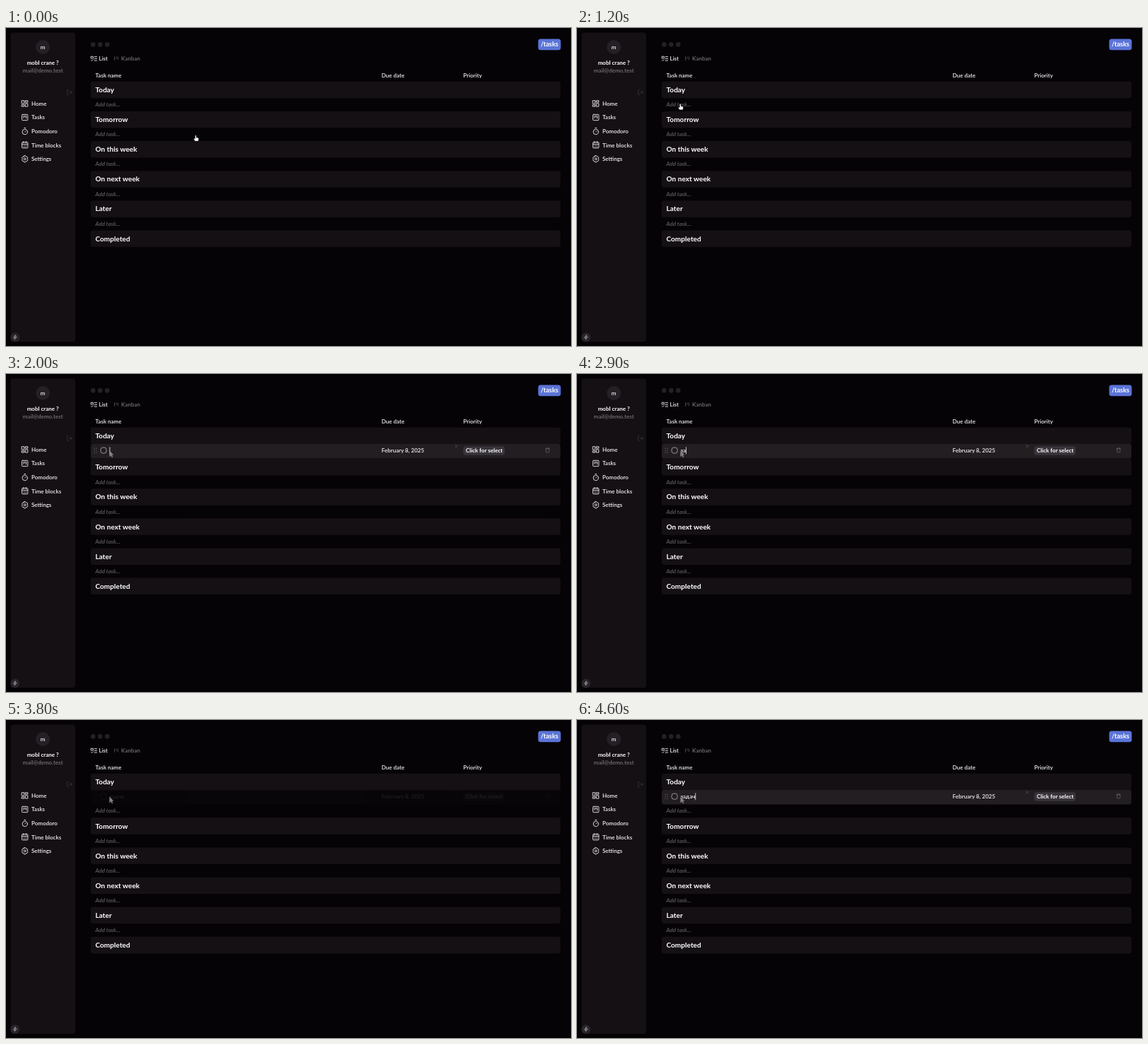
An HTML page for the animation above (5000 ms loop, 800 by 450 pixels).

```html
<!DOCTYPE html>
<html lang="en">
<head>
<meta charset="utf-8">
<title>Task list</title>
<style>
  html, body { margin: 0; width: 100%; height: 100%; overflow: hidden; background: #060307; }
  svg { display: block; width: 100vw; height: 100vh; }
  text { font: 600 8px Lato, "Open Sans", sans-serif; fill: #f4f2f5; }
  .bold { font-weight: 700; fill: #fff; }
  .title { font-size: 10.1px; }
  .add { font-style: italic; fill: #615d62; }
  .muted { fill: #767277; }
  .icon { fill: none; stroke: #ece9ed; stroke-width: 2; stroke-linecap: round; stroke-linejoin: round; }
</style>
</head>
<body>
<svg id="stage" viewBox="0 0 800 450" xmlns="http://www.w3.org/2000/svg"></svg>
<script>
const LOOP = 5000, STEP = 100;
const PANEL = '#151014', CHIP = '#252025';
const stage = document.getElementById('stage');

const rect = (x, y, w, h, r, fill) =>
  `<rect x="${x}" y="${y}" width="${w}" height="${h}" rx="${r}" fill="${fill}"/>`;
const dot = (x, y, r, fill) => `<circle cx="${x}" cy="${y}" r="${r}" fill="${fill}"/>`;
const label = (x, y, str, cls = '', extra = '') =>
  `<text x="${x}" y="${y}" class="${cls}" ${extra}>${str}</text>`;
// Icons are drawn on a 24 unit grid and centred on (x, y).
const icon = (x, y, d, scale = 0.5, stroke = '#ece9ed') =>
  `<path class="icon" style="stroke:${stroke}" d="${d}" transform="translate(${x} ${y}) scale(${scale}) translate(-12 -12)"/>`;

const SQUARE = 'M5 3H19Q21 3 21 5V19Q21 21 19 21H5Q3 21 3 19V5Q3 3 5 3Z';
const ICONS = {
  home: 'M3 3H10V12H3ZM14 3H21V8H14ZM14 12H21V21H14ZM3 16H10V21H3Z',
  board: SQUARE + 'M8 7V14M12 7V11M16 7V15',
  timer: 'M10 2H14M12 14L15 11M20 14A8 8 0 1 1 4 14A8 8 0 1 1 20 14',
  calendar: SQUARE + 'M3 9H21M8 1V5M16 1V5M8 13H8.1M12 13H12.1M16 13H16.1M8 17H8.1M12 17H12.1M16 17H16.1',
  gear: 'M10 2H14L15.5 5L18.5 5L21 9L19.5 12L21 15L18.5 19L15.5 19L14 22H10L8.5 19L5.5 19L3 15L4.5 12L3 9L5.5 5L8.5 5ZM15 12A3 3 0 1 1 9 12A3 3 0 1 1 15 12',
  list: 'M3 5H9V11H3ZM3 17L5 19L9 15M13 6H21M13 12H21M13 18H21',
  columns: 'M6 5V17M12 5V11M18 5V15',
  leave: 'M9 21H5Q3 21 3 19V5Q3 3 5 3H9M16 17L21 12L16 7M21 12H9',
  bin: 'M3 6H21M19 6V20Q19 22 17 22H7Q5 22 5 20V6M8 6V4Q8 2 10 2H14Q16 2 16 4V6',
  bolt: 'M13 2L4 14H11L10 22L20 10H13Z'
};

const MENU = [['Home', 'home'], ['Tasks', 'board'], ['Pomodoro', 'timer'],
  ['Time blocks', 'calendar'], ['Settings', 'gear']];
const SECTIONS = ['Today', 'Tomorrow', 'On this week', 'On next week', 'Later', 'Completed'];
const PITCH = 42.12;

const middle = 'text-anchor="middle"';

const sidebar = rect(6.5, 6.5, 91.5, 437.5, 4, PANEL)
  + dot(52.2, 27, 10, CHIP)
  + label(52.2, 29.6, 'm', '', middle)
  + label(52.2, 51.8, 'mobl crane ?', 'bold', middle)
  + label(52.2, 63.1, 'mail@demo.test', 'muted', middle)
  + icon(90, 91, ICONS.leave, 0.38, '#3d393e')
  + MENU.map(([name, key], i) => {
      const y = 106.9 + i * 19.6;
      return icon(26.7, y, ICONS[key], 0.46) + label(36, y + 2.8, name);
    }).join('')
  + dot(12.8, 437.7, 6.4, '#29252a')
  + icon(12.8, 437.7, ICONS.bolt, 0.28);

const header = [123.3, 133.3, 143.3].map(x => dot(x, 23.4, 3.3, CHIP)).join('')
  + rect(753.5, 15.5, 32, 15.7, 3.5, '#5b74d8')
  + label(769.5, 26.3, '/tasks', 'bold', middle + ' style="font-size:9.2px"')
  + icon(124.6, 43.4, ICONS.list, 0.45)
  + label(131.5, 46.4, 'List')
  + icon(156, 43.6, ICONS.columns, 0.4, '#615d62')
  + label(163, 46.4, 'Kanban', 'muted')
  + label(126.5, 69.5, 'Task name')
  + label(531.8, 69.5, 'Due date')
  + label(647.5, 69.5, 'Priority');

const section = (name, i) => {
  const y = 75.8 + i * PITCH;
  return rect(120, y, 665, 23.4, 3, PANEL) + label(126.5, y + 15.2, name, 'bold title');
};
const adder = i => label(126.5, 111.2 + i * PITCH, 'Add task...', 'add');

const sections = section(SECTIONS[0], 0)
  + `<g id="firstAdd">${adder(0)}</g><g id="rest">`
  + SECTIONS.slice(1).map((name, i) => section(name, i + 1) + (i < 4 ? adder(i + 1) : '')).join('')
  + '</g>';

const grip = [105.2, 108.2, 111.2].map(y =>
  dot(125.1, y, 0.75, '#5b575c') + dot(128, y, 0.75, '#5b575c')).join('');

const row = '<g id="row">'
  + rect(120, 98.9, 665, 20.5, 3, '#221e22')
  + grip
  + '<rect x="134" y="104" width="8.2" height="8.2" rx="3.3" fill="none" stroke="#a5a1a6" stroke-width=".9"/>'
  + label(146.5, 111.2, '', '', 'id="task"')
  + label(531.8, 111.2, 'February 8, 2025')
  + icon(637.6, 102.2, 'M6 6L18 18M18 6L6 18', 0.25, '#6f6b70')
  + rect(647.5, 102.3, 58.5, 12.5, 3, '#39343b')
  + label(650.9, 111.3, 'Click for select', 'bold')
  + icon(766.8, 107.7, ICONS.bin, 0.31, '#77737a')
  + '<rect id="caret" y="103.3" width=".8" height="10" fill="#f4f2f5"/></g>';

// Each cursor has its hot spot at (0, 0).
const cursors = '<g id="cursor">'
  + '<path id="point" fill="#fff" stroke="#111" stroke-width=".3" d="M-.8 .6Q0-.6 .8 .6V3.2L3.4 3.8Q4.4 4.1 4.2 5.2L3.6 8.2H-.9L-2.7 5.4Q-2.9 4.4-1.8 4.5L-.8 5.2Z"/>'
  + '<path id="palm" fill="#eee" stroke="#111" stroke-width=".3" d="M-2 1.4Q-1.6 .5-.9 1.2Q-.6-.4 .3 .3Q1.1-.3 1.5 1Q2.4 .7 2.5 1.9Q3.4 1.8 3.4 2.9L3.2 5.4Q2.8 8.2 .6 8.2Q-1.3 8.2-2.2 6.4L-3.5 4.2Q-3.4 3.2-2.4 3.9L-1.6 4.5Z"/>'
  + '<path id="arrow" fill="#858186" d="M0 0L6 6.3L3.6 6.6L5 9.5L3.6 10.1L2.2 7.2L0 9Z"/></g>';

stage.innerHTML = rect(0, 0, 800, 450, 0, '#060307') + sidebar + header + sections + row + cursors;

const part = id => document.getElementById(id);
const [firstAdd, rest, rowGroup, task, caret, cursor, point, palm, arrow] =
  ['firstAdd', 'rest', 'row', 'task', 'caret', 'cursor', 'point', 'palm', 'arrow'].map(part);

const TYPING = [[0, ''], [2500, 'за'], [2600, 'зад'], [2900, 'за'], [3000, 'з'], [3200, 'за'],
  [3300, 'задч'], [3400, 'задча'], [4400, 'зад'], [4500, 'зада'], [4600, 'задач']];

const show = (el, on) => el.setAttribute('visibility', on ? 'inherit' : 'hidden');
const move = (el, x, y) => el.setAttribute('transform', `translate(${x} ${y})`);
const mix = (a, b, p) => a + (b - a) * p;

function fade(t, start) {
  const p = Math.min(1, Math.max(0, (t - start) / 500));
  return t < start ? 0 : 1 - 0.9 * (1 - p) ** 2;
}

function draw(time) {
  const t = Math.floor(time % LOOP / STEP) * STEP;
  const created = t >= 1400, saved = t >= 3800;

  show(firstAdd, !created || saved);
  move(firstAdd, 0, saved ? 20.3 : 0);
  move(rest, 0, saved ? 20.4 : created ? 2.2 : 0);
  rowGroup.setAttribute('opacity', fade(t, saved ? 3800 : 1400));

  task.textContent = TYPING.filter(([at]) => at <= t).pop()[1];
  const width = task.textContent ? task.getComputedTextLength() : 0;
  caret.setAttribute('x', 146.6 + width);
  show(caret, t >= 2000 && t < 3800 || t >= 4400);

  const p = (1 - Math.cos(Math.PI * Math.min(1, t / 1200))) / 2;
  const typing = t >= 2000;
  show(point, !created);
  show(palm, created && !typing);
  show(arrow, typing);
  if (typing) move(cursor, 146.4, 108.2);
  else if (created) move(cursor, 145.4, 103.9);
  else move(cursor, mix(268.6, 146.2, p), mix(151.8, 107.5, p));
}

function tick(now) {
  draw(now);
  requestAnimationFrame(tick);
}
draw(0);
requestAnimationFrame(tick);
</script>
</body>
</html>
```
